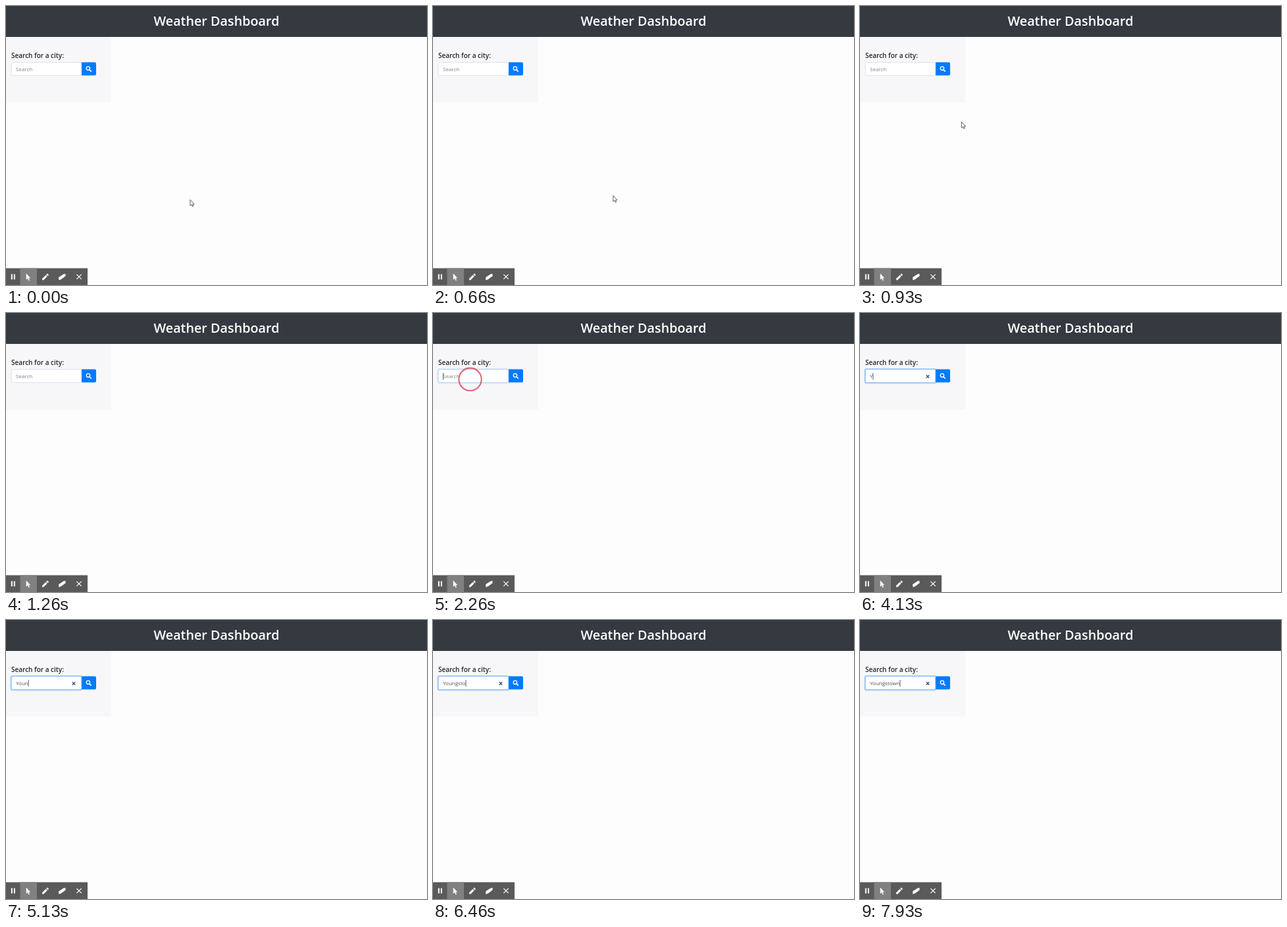
Recreate the animation shown at these times as an HTML page. Size 640 by 424 pixels, loop 8 s.

```html
<!DOCTYPE html>
<html lang="en">
<head>
<meta charset="utf-8">
<title>Weather Dashboard</title>
<style>
  html, body { margin: 0; width: 100%; height: 100%; overflow: hidden; background: #fdfdfd; }
  svg { display: block; width: 640px; height: 424px; }
  text { font-family: "Open Sans", "Noto Sans", sans-serif; font-size: 8px; }
  .heading { font-weight: 600; }
</style>
</head>
<body>
<svg viewBox="0 0 640 424">
  <rect width="640" height="47" fill="#343a40"/>
  <text class="heading" x="320" y="29.5" text-anchor="middle" fill="#fff" style="font-size:19.8px">Weather Dashboard</text>

  <rect y="47" width="160" height="100" fill="#f7f7fa"/>
  <text class="heading" x="8" y="79" fill="#212529" style="font-size:10px">Search for a city:</text>

  <rect id="glow" x="7.2" y="84.7" width="108.3" height="22" rx="2.8" fill="none" stroke="#007bff" stroke-opacity=".3" stroke-width="1.6"/>
  <path d="M115 85.5h20q2 0 2 2v16q0 2-2 2h-20z" fill="#007bff"/>
  <rect x="8.2" y="85.7" width="106.5" height="20" rx="2" fill="#fff" stroke="#ced4da" stroke-width=".7"/>
  <rect id="focus" x="8.2" y="85.7" width="106.5" height="20" rx="2" fill="none" stroke="#80bdff" stroke-width=".8"/>
  <g fill="none" stroke="#fff" stroke-linecap="round">
    <circle cx="124.9" cy="94.8" r="2.7" stroke-width="1.3"/>
    <path d="M127 97l2.2 2.2" stroke-width="1.7"/>
  </g>
  <text id="placeholder" x="15" y="99" fill="#7b838a">Search</text>
  <text id="typed" x="15" y="99" fill="#495057"></text>
  <path id="clear" d="M100.8 94.3l4.4 4.4m0-4.4l-4.4 4.4" stroke="#35578f" stroke-width="1.5"/>
  <rect id="caret" y="91" width=".8" height="10.5" fill="#33383d"/>

  <path id="cursor" d="M0 0v9.2l2-1.9 1.5 3 1.3-.6-1.4-2.9h2.8z" fill="#fff" stroke="#3c3c48" stroke-width=".8"/>
  <circle id="ripple" cx="56.5" cy="100.8" fill="none" stroke="#dc4a5e" stroke-width="2.1"/>

  <rect y="398.5" width="124" height="26" fill="#5a5a5a"/>
  <rect x="21.5" y="398.5" width="25.5" height="26" fill="#808080"/>
  <g fill="#fff">
    <path d="M7.8 407.5h2v8h-2zM11.8 407.5h2v8h-2z"/>
    <path d="M30.7 406.5v9.4l2.2-2 1.7 3.6 1.4-.7-1.7-3.4h3z"/>
    <path d="M55 414.3l5.5-5.5 2.2 2.2-5.5 5.5H55zM61.2 408.1l1.1-1.1q.7-.5 1.3.1l.9.9q.6.6.1 1.3l-1.1 1.1z"/>
    <path d="M80.2 412.3l7.3-4.8 3-.6v3.7l-7.2 5.2-3.1.8z"/>
  </g>
  <path d="M107.3 407.8l7.4 7.4m0-7.4l-7.4 7.4" stroke="#fff" stroke-width="1.2"/>
</svg>
<script>
const LOOP = 8000, CLICK = 2200, BLINK = 530;
const MOVE = { start: 600, end: 1200, from: [280, 294.5], bend: [175, 184], to: [57, 101] };
const WORD = "Youngstown";
const KEY_TIMES = [3660, 4400, 4600, 5060, 5660, 5860, 6060, 6460, 6600, 6730];

const el = id => document.getElementById(id);
const [glow, focus, placeholder, typed, clear, caret, cursor, ripple] =
  ["glow", "focus", "placeholder", "typed", "clear", "caret", "cursor", "ripple"].map(el);
const progress = (t, a, b) => Math.min(1, Math.max(0, (t - a) / (b - a)));
const show = (node, visible) => node.setAttribute("opacity", +visible);

function drawCursor(t) {
  const u = progress(t, MOVE.start, MOVE.end);
  const p = u * u * (3 - 2 * u), q = 1 - p;
  const [x, y] = [0, 1].map(i => q * q * MOVE.from[i] + 2 * p * q * MOVE.bend[i] + p * p * MOVE.to[i]);
  cursor.setAttribute("transform", `translate(${x} ${y})`);
  show(cursor, y > 106);
}

function drawClick(t) {
  const grow = progress(t, 2100, 2260);
  ripple.setAttribute("r", 17.2 * (1 - (1 - grow) ** 2));
  ripple.setAttribute("opacity", t < 2100 ? 0 : 0.85 * (1 - progress(t, 2270, 2400)));
  const focused = progress(t, CLICK, CLICK + 150);
  show(glow, focused);
  show(focus, focused);
}

function drawField(t) {
  const count = KEY_TIMES.filter(k => k <= t).length;
  typed.textContent = WORD.slice(0, count);
  show(placeholder, count === 0);
  show(clear, count > 0);
  const lastInput = count ? KEY_TIMES[count - 1] : CLICK;
  show(caret, t >= CLICK && (t - lastInput) % (2 * BLINK) < BLINK);
  caret.setAttribute("x", 15 + (count ? typed.getComputedTextLength() : 0));
}

function frame() {
  const t = performance.now() % LOOP;
  drawCursor(t);
  drawClick(t);
  drawField(t);
  requestAnimationFrame(frame);
}
frame();
</script>
</body>
</html>
```
